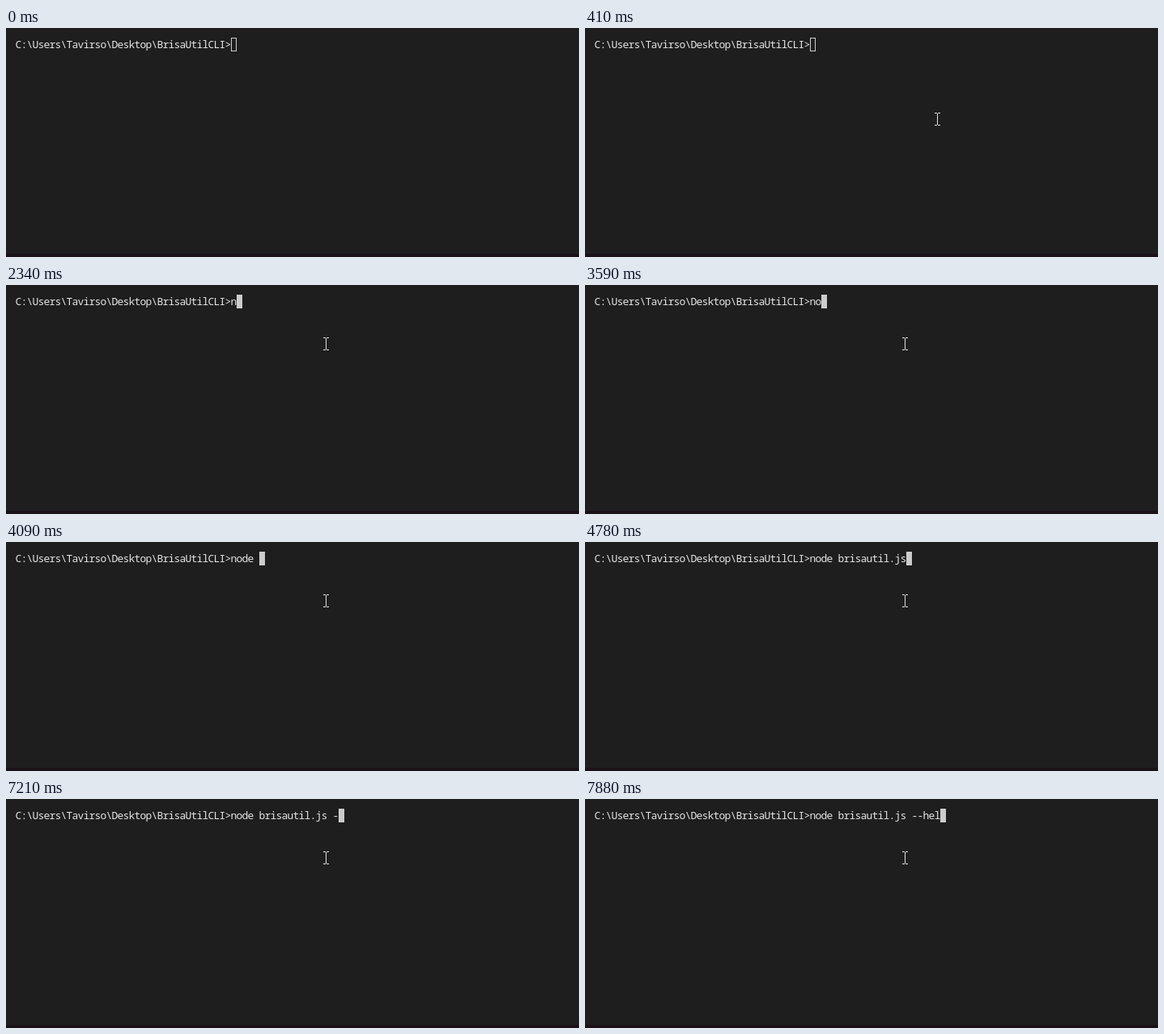
An HTML page for the animation above (8 s loop, 708x284 px).

```html
<!DOCTYPE html>
<html lang="en">
<head>
<meta charset="utf-8">
<title>Terminal</title>
<style>
  html, body { margin: 0; width: 100%; height: 100%; overflow: hidden; background: #1e1e1e; }
  svg { display: block; width: 708px; height: 284px; }
  /* 7.8px advance tightened to the 7px cell */
  text {
    font: 500 13px "Noto Sans Mono", "DejaVu Sans Mono", monospace;
    letter-spacing: -.8px;
    fill: #e5e5e5;
    white-space: pre;
  }
  path, rect { shape-rendering: crispEdges; }
</style>
</head>
<body>
<svg viewBox="0 0 708 284">
  <rect width="708" height="284" fill="#1e1e1e"/>
  <rect y="280" width="708" height="4" fill="#1b1218"/>
  <text id="line" x="11.6" y="25"></text>
  <rect id="caret" x=".5" y="12.5" width="6" height="16" stroke="#cccccc"/>
  <path id="pointer" fill="#e1e1e1" d="M0 0h3v1h1v-1h3v1h-3v14h3v1h-3v-1h-1v1h-3v-1h3v-14h-3z"/>
</svg>
<script>
const LOOP = 8000;
const CELL = 7;
const LEFT = 12;
const PROMPT = "C:\\Users\\Tavirso\\Desktop\\BrisaUtilCLI>";
const COMMAND = "node brisautil.js --help";

// [time in ms, typed characters]; the jump to 17 is a tab completion
const TYPING = [
  [0, 0], [2340, 1], [3590, 2], [3780, 3], [3980, 4], [4090, 5],
  [4340, 6], [4410, 7], [4660, 8], [4780, 17], [5840, 18],
  [7210, 19], [7320, 20], [7570, 21], [7700, 22], [7880, 23]
];

const MOVE = { start: 50, step: 68, count: 9, from: [597, 265], to: [392, 65] };
const FOCUS = 730;

const line = document.getElementById("line");
const caret = document.getElementById("caret");
const pointer = document.getElementById("pointer");
const easeOut = p => 1 - (1 - p) ** 2;

function typedAt(t) {
  return TYPING.findLast(([time]) => time <= t)[1];
}

function pointerAt(t) {
  const step = Math.min(MOVE.count, Math.floor((t - MOVE.start) / MOVE.step));
  const p = easeOut(Math.max(0, step) / MOVE.count);
  return MOVE.from.map((a, i) => Math.round(a + (MOVE.to[i] - a) * p));
}

function draw(t) {
  const text = PROMPT + COMMAND.slice(0, typedAt(t));
  if (line.textContent !== text) line.textContent = text;
  caret.setAttribute("transform", `translate(${LEFT + text.length * CELL} 0)`);
  caret.setAttribute("fill", t < FOCUS ? "none" : "#cccccc");
  pointer.setAttribute("visibility", t < MOVE.start ? "hidden" : "visible");
  pointer.setAttribute("transform", `translate(${pointerAt(t)})`);
}

const start = performance.now();
function frame() {
  draw((performance.now() - start) % LOOP);
  requestAnimationFrame(frame);
}
frame();
</script>
</body>
</html>
```
